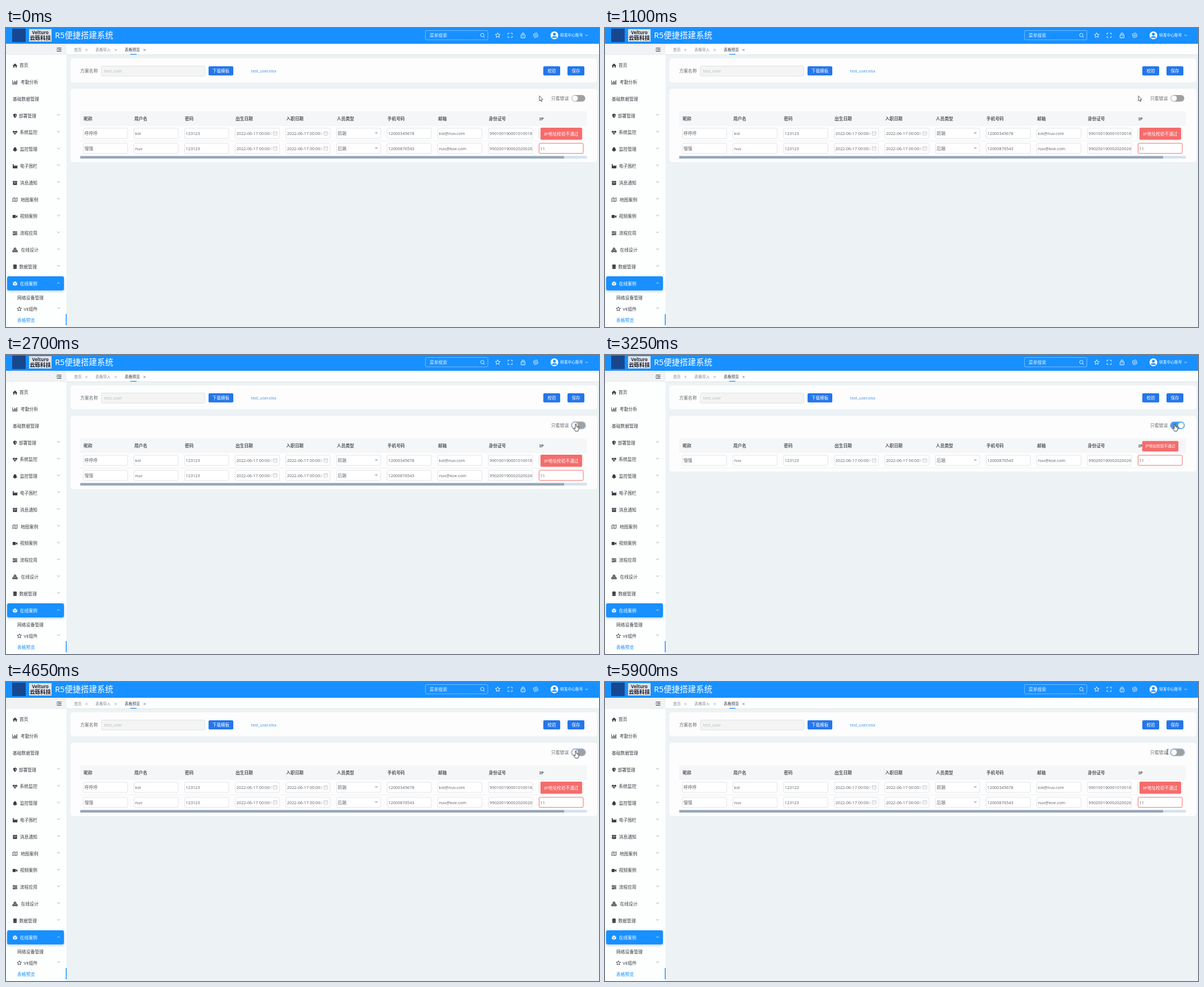
Recreate the animation shown at these times as an HTML page with a canvas. Size 1054 by 531 pixels, loop 5950 ms.

```html
<!DOCTYPE html>
<html lang="zh">
<head>
<meta charset="utf-8">
<title>表格预览</title>
<style>
html,body{margin:0;width:100%;height:100%;overflow:hidden;background:#edf2f5}
canvas{display:block;width:1054px;height:531px}
</style>
</head>
<body>
<canvas id="stage"></canvas>
<script>
const W = 1054, H = 531, LOOP = 5950, STEP = 50;
const BLUE = '#1890ff', RED = '#f56c6c', INK = '#383c42', GREY = '#66696e';
const FONT = '"Noto Sans","Noto Sans CJK SC","Noto Sans CJK",sans-serif';
const cv = document.getElementById('stage'), c = cv.getContext('2d');
const dpr = window.devicePixelRatio || 1;
cv.width = W * dpr;
cv.height = H * dpr;

const clamp = v => Math.max(0, Math.min(1, v));
const span = (t, a, b) => clamp((t - a) / (b - a));
const ease = p => p * p * (3 - 2 * p);
const mix = (a, b, p) => a + (b - a) * p;

function rect(x, y, w, h, fill, r = 0, stroke) {
  c.beginPath();
  c.roundRect(x, y, w, h, r);
  if (fill) { c.fillStyle = fill; c.fill(); }
  if (stroke) { c.strokeStyle = stroke; c.lineWidth = 1; c.stroke(); }
}
function text(s, x, cy, size = 7.8, color = INK, weight = 400, align = 'left') {
  c.font = `${weight} ${size}px ${FONT}`;
  c.fillStyle = color;
  c.textAlign = align;
  c.fillText(s, x, cy + size * 0.36);
}
function line(pts, color, w = 1, close, fill) {
  c.beginPath();
  pts.forEach(([x, y], i) => i ? c.lineTo(x, y) : c.moveTo(x, y));
  if (close) c.closePath();
  if (fill) { c.fillStyle = fill; c.fill(); }
  if (color) { c.strokeStyle = color; c.lineWidth = w; c.stroke(); }
}
function disc(x, y, r, fill, stroke, w = 1) {
  c.beginPath();
  c.arc(x, y, r, 0, 7);
  if (fill) { c.fillStyle = fill; c.fill(); }
  if (stroke) { c.strokeStyle = stroke; c.lineWidth = w; c.stroke(); }
}
function at(x, y, draw, s = 1) {
  c.save();
  c.translate(x, y);
  c.scale(s, s);
  draw();
  c.restore();
}
const chevron = (x, y, color, d = 1) =>
  line([[x - 2.4, y - 1.2 * d], [x, y + 1.2 * d], [x + 2.4, y - 1.2 * d]], color, 0.8);
const cross = (x, y, color) => {
  line([[x - 1.9, y - 1.9], [x + 1.9, y + 1.9]], color, 0.7);
  line([[x + 1.9, y - 1.9], [x - 1.9, y + 1.9]], color, 0.7);
};
function star(x, y, r, color) {
  const pts = Array.from({length: 10}, (_, i) => {
    const a = i * Math.PI / 5 - Math.PI / 2, k = i % 2 ? r * 0.47 : r;
    return [x + k * Math.cos(a), y + k * Math.sin(a)];
  });
  line(pts, color, 0.9, true);
}

// Menu icons, drawn around the origin in about 8 by 8 pixels
const box = (x, y, w, h, r) => rect(x, y, w, h, INK, r);
const solid = pts => line(pts, null, 0, true, INK);
const cube = (color, edge) => {
  line([[0, -4], [3.8, -2], [3.8, 2], [0, 4], [-3.8, 2], [-3.8, -2]], null, 0, true, color);
  line([[-3.8, -2], [0, 0], [3.8, -2]], edge, 0.8);
  line([[0, 0], [0, 4]], edge, 0.8);
};
const icons = {
  home() {
    solid([[-4.2, 0.3], [0, -3.7], [4.2, 0.3], [3, 0.3], [3, 3.6], [1, 3.6], [1, 1], [-1, 1], [-1, 3.6], [-3, 3.6], [-3, 0.3]]);
  },
  chart() {
    line([[-4.3, -3.5], [-4.3, 3.4], [4.5, 3.4]], INK, 0.9);
    [2.5, 5, 3.5, 6].forEach((h, i) => box(-2.9 + i * 1.9, 2.4 - h, 1.2, h));
  },
  shield() {
    solid([[0, -4], [3.1, -2.8], [2.7, 1], [0, 4], [-2.7, 1], [-3.1, -2.8]]);
    line([[0.9, -2.3], [0.9, 1.6]], '#fff', 0.9);
  },
  heart() {
    disc(-2, -1.3, 2.1, INK);
    disc(2, -1.3, 2.1, INK);
    solid([[-3.9, -0.5], [3.9, -0.5], [0, 3.8]]);
    line([[-4, 0.2], [-1.4, 0.2], [-0.5, -1.2], [0.6, 1.5], [1.4, 0.2], [4, 0.2]], '#fff', 0.7);
  },
  bell() {
    disc(0, -1, 2.5, INK);
    solid([[-2.5, -1], [2.5, -1], [3.6, 2.4], [-3.6, 2.4]]);
    disc(0, 3, 1.1, INK);
    box(-0.5, -4.2, 1, 1.5);
  },
  plant() {
    solid([[-4, -3.7], [-2.2, -3.7], [-2.2, 0], [1, -1.9], [1, 0], [4.2, -1.9], [4.2, 3.8], [-4, 3.8]]);
  },
  archive() {
    box(-4, -3.5, 8, 2);
    box(-3.6, -1, 7.2, 4.6, 0.5);
    line([[-1.3, 0.4], [1.3, 0.4]], '#fff', 0.8);
  },
  map() {
    line([[-4.2, -2.5], [-1.4, -3.5], [1.4, -2.5], [4.2, -3.5], [4.2, 2.5], [1.4, 3.5], [-1.4, 2.5], [-4.2, 3.5]], INK, 0.8, true);
    line([[-1.4, -3.5], [-1.4, 2.5]], INK, 0.8);
    line([[1.4, -2.5], [1.4, 3.5]], INK, 0.8);
  },
  video() {
    box(-4.2, -2.7, 5.6, 5.4, 0.8);
    solid([[1.8, -0.8], [4.2, -2.4], [4.2, 2.4], [1.8, 0.8]]);
  },
  server() {
    [-3.4, -0.9, 1.6].forEach((y, i) => {
      box(-4, y, 8, 1.9, 0.3);
      rect(i % 2 ? -2.6 : 1.2, y + 0.6, 1.4, 0.7, '#fff');
    });
  },
  cubes() {
    [[0, -2.2], [-2.4, 1.8], [2.4, 1.8]].forEach(([x, y]) => at(x, y, () => cube(INK, '#fff'), 0.62));
  },
  data() {
    [-2.8, -0.2, 2.4].forEach(y => {
      c.beginPath();
      c.ellipse(0, y, 3.3, 1.4, 0, 0, 7);
      c.fillStyle = INK;
      c.fill();
      box(-3.3, y, 6.6, 0.8);
    });
  }
};
const menu = [
  ['首页', 24, 'home'], ['考勤分析', 26, 'chart'], ['基础数据管理', 12],
  ['部署管理', 22.7, 'shield'], ['系统监控', 24.5, 'heart'], ['监控管理', 24.7, 'bell'],
  ['电子围栏', 24.7, 'plant'], ['消息通知', 24.7, 'archive'], ['地图案例', 26, 'map'],
  ['视频案例', 24.7, 'video'], ['流程应用', 24.7, 'server'], ['在线设计', 26.5, 'cubes'],
  ['数据管理', 23.5, 'data']
];

function header() {
  rect(0, 0, W, 28, BLUE);
  rect(11, 1, 24, 24, '#17478f');
  rect(41, 2, 40, 22, '#dfe2e6');
  text('Velturo', 61, 8, 8, '#252a38', 700, 'center');
  text('云砾科技', 61, 18, 9.4, '#151a28', 700, 'center');
  text('R5便捷搭建系统', 87, 13, 14.4, '#fff');

  rect(745.5, 4.5, 111, 16.5, null, 2, 'rgba(255,255,255,.4)');
  text('菜单搜索', 753, 13, 7.8, '#e4f1ff');
  disc(846.5, 12.5, 3, null, '#fff', 0.9);
  line([[848.7, 14.8], [850.8, 16.9]], '#fff', 0.9);

  star(874, 13, 4.5, '#fff');
  for (const sx of [-1, 1]) for (const sy of [-1, 1])
    line([[896 + sx * 1.4, 13 + sy * 3.8], [896 + sx * 3.8, 13 + sy * 3.8], [896 + sx * 3.8, 13 + sy * 1.4]], '#fff', 0.9);
  rect(915.5, 12, 7, 5.5, null, 0.7, '#fff');
  c.beginPath();
  c.arc(919, 11, 2.2, Math.PI, 0);
  c.stroke();
  line([[919, 13.7], [919, 15.7]], '#fff', 0.9);
  const gear = Array.from({length: 16}, (_, i) => {
    const a = (i + 0.5) * Math.PI / 8, r = i % 4 < 2 ? 4.3 : 3.5;
    return [941.5 + r * Math.cos(a), 13 + r * Math.sin(a)];
  });
  line(gear, '#fff', 0.9, true);
  disc(941.5, 13, 1.5, null, '#fff', 0.8);

  disc(974.7, 13, 6.9, '#fff');
  disc(974.7, 10.9, 2.5, BLUE);
  c.beginPath();
  c.ellipse(974.7, 17.4, 4.5, 2.9, 0, Math.PI, 0);
  c.fill();
  text('研发中心账号', 985, 13, 6.75, '#fff');
  chevron(1032, 13, '#fff');
}

function sidebar() {
  rect(0, 28, 107.5, H - 28, '#fdfefe');
  rect(0, 28, 107.5, 20, '#f0f2f3');
  [35.7, 38.5, 41.3].forEach((y, i) => line([[i === 1 ? 93 : 90.5, y], [98.5, y]], INK, 1.1));
  line([[90.5, 37], [92, 38.5], [90.5, 40]], null, 0, true, INK);

  menu.forEach(([label, x, icon], i) => {
    const y = 66.3 + i * 29.8;
    if (icon) at(16, y + 0.3, icons[icon]);
    text(label, x, y);
    if (i > 2) chevron(93.4, y - 1.5, '#8a8d92');
  });

  c.save();
  c.shadowColor = 'rgba(24,100,190,.35)';
  c.shadowBlur = 4 * dpr;
  c.shadowOffsetY = 1.5 * dpr;
  rect(2, 441, 101, 25, BLUE, 3);
  c.restore();
  at(16, 454, () => cube('#fff', BLUE));
  text('在线案例', 24.7, 453.7, 7.8, '#fff');
  chevron(93.4, 453, '#fff', -1);

  text('网络设备管理', 20, 479);
  star(23.8, 499, 4, INK);
  text('VE组件', 31.5, 499);
  chevron(93.4, 497.5, '#8a8d92');
  text('表格预览', 20, 518.7, 7.8, BLUE);
  rect(106.3, 508, 1.5, 20, BLUE);
}

function tabs() {
  rect(107.5, 28, W - 107.5, 19, '#fdfefe');
  rect(107.5, 47, W - 107.5, 1, '#dfe5e2');
  text('首页', 121, 38.5, 6.75, '#85888c');
  cross(143, 39, '#999');
  text('表格导入', 159, 38.5, 6.75, '#85888c');
  cross(195, 39, '#999');
  text('表格预览', 211, 38.5, 6.75, INK);
  cross(246.3, 39, '#555');
  rect(221, 46, 11, 1.2, BLUE);
}

function button(label, x, w) {
  rect(x, 68, w, 16.3, '#2476ea', 2);
  text(label, x + w / 2, 76.4, 7.6, '#fff', 400, 'center');
}

function form() {
  rect(114.5, 54, 936.5, 42.5, '#fdfdfd', 5);
  text('方案名称', 132, 76.3, 7.8, GREY);
  rect(169.5, 67.5, 184, 18, '#f3f4f3', 2, '#e0e3e7');
  text('test_user', 174.5, 76.8, 7.4, '#b9bcc2');
  button('下载模板', 360, 44);
  text('test_user.xlsx', 435.5, 76.3, 7.3, '#4796ea');
  button('校验', 955, 30);
  button('保存', 998, 30);
}

const heads = ['昵称', '用户名', '密码', '出生日期', '入职日期', '人员类型', '手机号码', '邮箱', '身份证号', 'IP'];
const date = '2022-06-17 00:00:00';
const rows = [
  ['呼呼呼', 'kol', '123123', date, date, '前端', '12000345678', 'kol@nuv.com', '990100190001010018', ''],
  ['慢慢', 'nuv', '123123', date, date, '后端', '12000876543', 'nuv@koe.com', '990200190002020026', '11']
];

function row(cells, y) {
  cells.forEach((value, i) => {
    const x = 137.5 + i * 90, bad = value === '11';
    rect(x, y - 9, 78.5, 18, '#fff', 2, bad ? RED : '#e0e3e8');
    c.save();
    c.beginPath();
    c.rect(x + 1, y - 9, i === 3 || i === 4 ? 63 : 77, 18);
    c.clip();
    text(value, x + 2, y + 0.3, /^[ -~]/.test(value) ? 7.35 : 7.8, GREY);
    c.restore();
    if (i === 3 || i === 4) {
      rect(x + 67.5, y - 3, 6.8, 6.2, null, 0.5, '#c3c6cc');
      line([[x + 67.5, y - 0.7], [x + 74.3, y - 0.7]], '#c3c6cc', 0.8);
    }
    if (i === 5) line([[x + 67.5, y - 1.8], [x + 74, y - 1.8], [x + 70.8, y + 1.6]], null, 0, true, '#b9bcc2');
  });
  rect(132, y + 13, 900, 0.7, '#ebeef2');
}

function table(onlyBad) {
  rect(114.5, 108, 936.5, onlyBad ? 99 : 130, '#fdfdfd', 5);
  rect(132, 148, 900.5, 26, '#f5f6f7');
  heads.forEach((h, i) => text(h, 138 + i * 90, 161, 7.7, '#55585e', 700));
  if (onlyBad) return row(rows[1], 187);
  row(rows[0], 187);
  row(rows[1], 213.7);
  rect(132, 227.5, 900.5, 4.2, '#d3e0ee');
  rect(132, 227.5, 860, 4.2, '#93a5b8');
}

function toggle(p, focus) {
  text('只看错误', 969, 125, 7.8, GREY);
  if (focus) rect(1004, 117.8, 27, 14.2, '#a9c9f6', 7.1);
  rect(1005.3, 119, 24.4, 11.8, '#a0a0a0', 5.9);
  c.globalAlpha = p;
  rect(1005.3, 119, 24.4, 11.8, '#3d98fb', 5.9);
  c.globalAlpha = 1;
  disc(mix(1011.3, 1023.7, p), 124.9, 5, '#fff');
}

function tooltip(y, scale) {
  at(987, y, () => {
    rect(-37, -10.7, 74, 21.4, RED, 2);
    text('IP地址校验不通过', 0, 0, 7.7, '#fff', 400, 'center');
  }, scale);
}

const pointers = {
  arrow() {
    line([[0, 0], [0, 9], [2.1, 7.2], [3.5, 10.2], [4.8, 9.6], [3.5, 6.7], [6.2, 6.4]], '#333', 0.8, true, '#fff');
  },
  beam() {
    line([[0, -4], [0, 4]], '#333', 0.9);
    line([[-1.8, -4.3], [1.8, -4.3]], '#333', 0.8);
    line([[-1.8, 4.3], [1.8, 4.3]], '#333', 0.8);
  },
  hand() {
    line([[-1, 0], [0.6, 0], [0.8, 4], [4.6, 5], [5.4, 6.3], [4.6, 10], [3.8, 12.6], [-1, 12.6], [-4, 8.2], [-3.4, 7.2], [-1.2, 8.2]], '#333', 0.9, true, '#fff');
    line([[2, 4.6], [2, 6.8]], '#333', 0.6);
    line([[3.6, 5], [3.6, 7]], '#333', 0.6);
  }
};

function pointer(t) {
  let x = 948, y = 120.5;
  const a = ease(span(t, 1200, 1700)), b = ease(span(t, 1750, 2100)), d = ease(span(t, 5500, 5900));
  x = mix(mix(mix(x, 997.5, a), 1013, b), 1000, d);
  y = mix(mix(mix(y, 122, a), 122.6, b), 124, d);
  const kind = x < 968 ? 'arrow' : x < 1004 ? 'beam' : 'hand';
  at(x, y, pointers[kind]);
}

function draw(t) {
  c.setTransform(dpr, 0, 0, dpr, 0, 0);
  rect(0, 0, W, H, '#edf2f5');
  header();
  sidebar();
  tabs();
  form();
  const onlyBad = t >= 2900 && t < 4350;
  table(onlyBad);
  toggle(ease(span(t, 2800, 3150)) - ease(span(t, 4250, 4600)), t >= 2650);
  if (onlyBad) tooltip(162, mix(0.45, 0.87, ease(span(t, 2900, 3250))));
  else tooltip(187.8, t < 2900 ? 1 : mix(0.45, 1, ease(span(t, 4300, 4600))));
  pointer(t);
}

function tick(now) {
  draw(Math.floor(now % LOOP / STEP) * STEP);
  requestAnimationFrame(tick);
}
requestAnimationFrame(tick);
</script>
</body>
</html>
```
